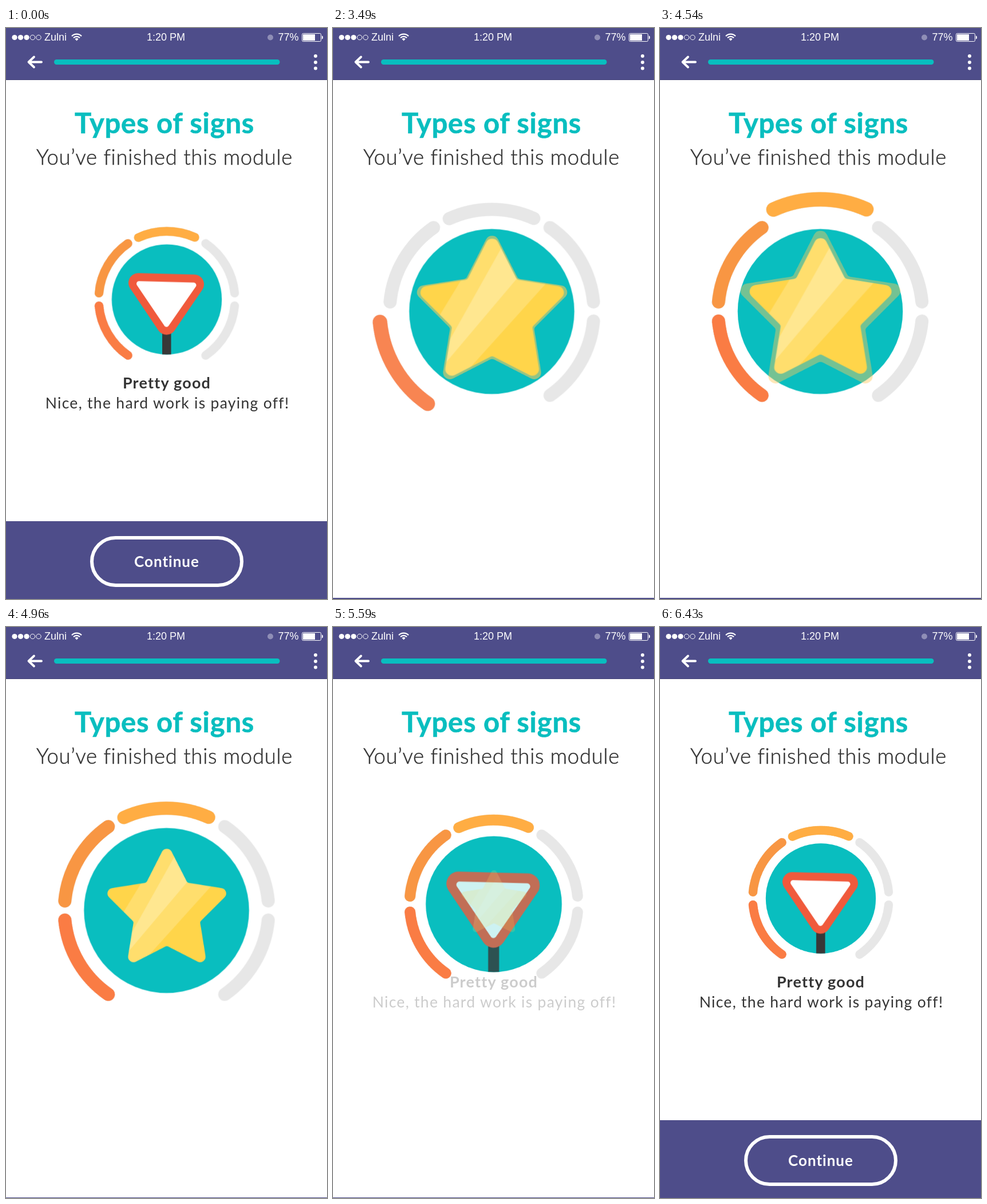
Animation of 561 by 998 pixels, one loop 6800 ms. Source, as an HTML page:

```html
<!DOCTYPE html>
<html lang="en">
<head>
<meta charset="utf-8">
<title>Module finished</title>
<style>
  html, body { margin: 0; width: 100%; height: 100%; overflow: hidden; background: #fff; }
  svg { display: block; width: 100vw; height: 100vh; }

  .status { font: 18px "Liberation Sans", Arial, sans-serif; fill: #fff; }
  .copy { font-family: Lato, sans-serif; text-anchor: middle; fill: #343434; }
  .title { font-size: 49px; font-weight: 700; letter-spacing: .75px; fill: #09bebf; stroke: #09bebf; stroke-width: .6; }
  .subtitle { font-size: 36.5px; font-weight: 300; letter-spacing: .7px; stroke: #343434; stroke-width: .5; }
  .grade { font-size: 27px; font-weight: 700; letter-spacing: 1.2px; }
  .praise { font-size: 26.5px; letter-spacing: 1.3px; }
  .button { font-size: 26px; font-weight: 700; letter-spacing: 1px; fill: #fff; }

  .arc { fill: none; stroke: #e7e7e7; stroke-width: 23; stroke-linecap: round; }
  .arc.long { stroke-dasharray: 49.8 400; }
  .arc.top { stroke-dasharray: 48.9 400; }

  .loop { animation: 6.8s linear infinite; }
  .drift { animation-name: drift; }
  .shrink { animation-name: shrink; }
  .pulse { animation-name: pulse; }
  .first { animation-delay: 3.25s; }
  .second { animation-delay: 3.75s; }
  .third { animation-delay: 4.25s; }
  .fill1 { animation-name: fill1; stroke: #fa7c44; }
  .fill2 { animation-name: fill2; stroke: #f89643; }
  .fill3 { animation-name: fill3; stroke: #ffad43; }
  .sign { animation-name: sign; }
  .rise { animation-name: rise; }
  .beat { animation-name: beat; }
  .star { animation-name: star; }
  .halo { animation-name: halo; }
  .result { animation-name: result; }
  .footer { animation-name: footer; }

  @keyframes drift {
    0%, 43.07% { transform: translateX(281px); }
    43.08% { transform: translateX(276px); }
    58.53% { transform: translateX(278.8px); }
    66.76% { transform: translateX(280px); }
    78.09%, 100% { transform: translateX(281px); }
  }
  @keyframes shrink {
    0%, 43.07% { transform: translateY(474.4px) scale(.667); }
    43.08% { transform: translateY(495.5px) scale(1); }
    73.51% { transform: translateY(495.5px) scale(1); animation-timing-function: cubic-bezier(.65,0,.35,1); }
    90.58%, 100% { transform: translateY(474.4px) scale(.667); }
  }
  /* 250 ms out, 500 ms back */
  @keyframes pulse {
    0% { transform: scale(1); animation-timing-function: cubic-bezier(.37,0,.63,1); }
    3.676% { transform: scale(1.1); animation-timing-function: cubic-bezier(.37,0,.63,1); }
    11.03%, 100% { transform: scale(1); }
  }
  @keyframes fill1 {
    0%, 43.07% { opacity: 1; }
    43.08%, 48.5% { opacity: 0; }
    51.6%, 100% { opacity: 1; }
  }
  @keyframes fill2 {
    0%, 43.07% { opacity: 1; }
    43.08%, 55.9% { opacity: 0; }
    59%, 100% { opacity: 1; }
  }
  @keyframes fill3 {
    0%, 43.07% { opacity: 1; }
    43.08%, 63.2% { opacity: 0; }
    66.4%, 100% { opacity: 1; }
  }
  @keyframes sign {
    0%, 43.07% { opacity: 1; }
    43.08%, 76.91% { opacity: 0; }
    83.53%, 100% { opacity: 1; }
  }
  @keyframes star {
    0%, 43.07% { opacity: 0; }
    43.08%, 76.8% { opacity: 1; }
    83.53%, 100% { opacity: 0; }
  }
  @keyframes rise {
    0%, 43.08% { transform: translateY(5px); }
    78.09%, 100% { transform: translateY(0); }
  }
  @keyframes beat {
    0%, 47.794%, 55.147%, 62.5% { transform: scale(1); animation-timing-function: cubic-bezier(.37,0,.63,1); }
    51.471%, 58.824%, 66.176% { transform: scale(1.21); animation-timing-function: cubic-bezier(.37,0,.63,1); }
    69.853%, 76.91% { transform: scale(1); }
    83.53%, 100% { transform: scale(.58); }
  }
  @keyframes halo {
    0%, 50.73% { opacity: 0; transform: scale(1.2); }
    50.74%, 58.09%, 65.44% { opacity: .68; transform: scale(1.2); }
    54.485%, 61.838%, 69.191% { opacity: 0; transform: scale(1.61); }
    58.08%, 65.43%, 100% { opacity: 0; transform: scale(1.61); }
  }
  @keyframes result {
    0%, 43.07% { opacity: 1; }
    43.08%, 80.9% { opacity: 0; }
    86.2%, 100% { opacity: 1; }
  }
  @keyframes footer {
    0%, 43.07% { transform: translateY(0); }
    43.08%, 72% { transform: translateY(134px); }
    73% { transform: translateY(135px); }
    81.8% { transform: translateY(135px); animation-timing-function: cubic-bezier(.65,0,.35,1); }
    94.5%, 100% { transform: translateY(0); }
  }
</style>
</head>
<body>
<svg viewBox="0 0 561 998" preserveAspectRatio="none">
  <defs>
    <path id="star"/>
    <clipPath id="starClip"><use href="#star"/></clipPath>
    <clipPath id="discClip"><circle r="96.2"/></clipPath>
    <circle id="ring" r="178.5" pathLength="360"/>
  </defs>

  <rect width="561" height="91" fill="#4e4d8a"/>
  <rect y="90" width="561" height="1" fill="#444379"/>
  <g class="status">
    <circle cx="15" cy="16.5" r="4.6"/>
    <circle cx="25.5" cy="16.5" r="4.6"/>
    <circle cx="36" cy="16.5" r="4.6"/>
    <g fill="none" stroke="#fff">
      <circle cx="46.5" cy="16.5" r="4.2"/>
      <circle cx="57" cy="16.5" r="4.2"/>
      <path d="M115 14.2a12 12 0 0 1 17 0M118 17.2a7.8 7.8 0 0 1 11 0" stroke-width="2.3"/>
    </g>
    <path d="M123.5 22.5l-3-3.2a4.3 4.3 0 0 1 6 0z"/>
    <text x="67" y="22">Zulni</text>
    <text x="246" y="22">1:20 PM</text>
    <circle cx="462" cy="16.5" r="5" fill="#8f8eb6"/>
    <text x="475.5" y="22">77%</text>
    <rect x="517.5" y="9.5" width="33" height="14" rx="2" fill="none" stroke="#fff"/>
    <rect x="519" y="11" width="21" height="11"/>
    <path d="M552 13.5q2 0 2 3t-2 3z"/>
  </g>
  <path d="M62 59.5H40M49 50.5l-9.500 9 9.500 9" fill="none" stroke="#fff" stroke-width="3.8" stroke-linecap="round" stroke-linejoin="round"/>
  <rect x="84" y="55" width="394.5" height="9" rx="4.5" fill="#09bebf"/>
  <g fill="#fff">
    <circle cx="541" cy="49" r="3"/>
    <circle cx="541" cy="60" r="3"/>
    <circle cx="541" cy="70.5" r="3"/>
  </g>

  <g class="copy">
    <text class="title" x="277" y="184">Types of signs</text>
    <text class="subtitle" x="277" y="238.5">You’ve finished this module</text>
  </g>

  <g class="loop result copy">
    <text class="grade" x="281" y="629.5">Pretty good</text>
    <text class="praise" x="282" y="665">Nice, the hard work is paying off!</text>
  </g>

  <g class="loop drift"><g class="loop shrink">
    <use href="#ring" class="arc long" transform="rotate(5.4)"/>
    <use href="#ring" class="arc long" transform="rotate(304.8)"/>
    <g class="loop pulse first"><g transform="rotate(124.8)">
      <use href="#ring" class="arc long"/>
      <use href="#ring" class="arc long loop fill1"/>
    </g></g>
    <g class="loop pulse second"><g transform="rotate(185.4)">
      <use href="#ring" class="arc long"/>
      <use href="#ring" class="arc long loop fill2"/>
    </g></g>
    <g class="loop pulse third"><g transform="rotate(245.4)">
      <use href="#ring" class="arc top"/>
      <use href="#ring" class="arc top loop fill3"/>
    </g></g>

    <circle r="144.3" fill="#09bebf"/>
    <g class="loop sign"><g transform="scale(1.5)" clip-path="url(#discClip)" stroke-linejoin="round">
      <rect x="-8" y="55" width="15.5" height="45" fill="#383838"/>
      <path d="M-50-29L48-26.5L-.5 44.6z" fill="#f05a3c" stroke="#f05a3c" stroke-width="34"/>
      <path d="M-48.5-27.5L47-25L-.5 43.5z" fill="#fff" stroke="#fff" stroke-width="9"/>
    </g></g>

    <g transform="translate(0.5 5)">
      <use href="#star" class="loop halo" fill="#ffc95a"/>
    </g>
    <g class="loop rise"><g class="loop beat"><g class="loop star">
      <g clip-path="url(#starClip)" transform="translate(0.5 0)">
        <rect x="-130" y="-130" width="260" height="260" fill="#ffd54a"/>
        <path d="M3-127L145-118L-76 127L-130 91z" fill="#ffde6d"/>
        <path d="M24-114L85-109L-111 123L-100 107z" fill="#ffe790"/>
      </g>
    </g></g></g>
  </g></g>

  <g class="loop footer">
    <rect y="862" width="561" height="140" fill="#4e4d8a"/>
    <rect x="150" y="891" width="262" height="83" rx="41.5" fill="none" stroke="#fff" stroke-width="6"/>
    <text class="copy button" x="281" y="942">Continue</text>
  </g>
</svg>
<script>
  // Five-pointed star with rounded tips and notches
  const corners = Array.from({ length: 10 }, (_, i) => {
    const isTip = i % 2 === 0;
    const angle = (i * 36 - 90) * Math.PI / 180;
    const reach = isTip ? 120 : 61;
    return { x: reach * Math.cos(angle), y: reach * Math.sin(angle), radius: isTip ? 9.5 : 5, sweep: isTip ? 1 : 0 };
  });

  function direction(from, to) {
    const length = Math.hypot(to.x - from.x, to.y - from.y);
    return { x: (to.x - from.x) / length, y: (to.y - from.y) / length };
  }

  function roundedPath(points) {
    const parts = points.map((p, i) => {
      const back = direction(p, points.at(i - 1));
      const ahead = direction(p, points[(i + 1) % points.length]);
      const half = Math.acos(back.x * ahead.x + back.y * ahead.y) / 2;
      const cut = p.radius / Math.tan(half);
      const along = d => `${p.x + d.x * cut} ${p.y + d.y * cut}`;
      return `${i ? 'L' : 'M'}${along(back)}A${p.radius} ${p.radius} 0 0 ${p.sweep} ${along(ahead)}`;
    });
    return parts.join('') + 'z';
  }

  document.getElementById('star').setAttribute('d', roundedPath(corners));
</script>
</body>
</html>
```
